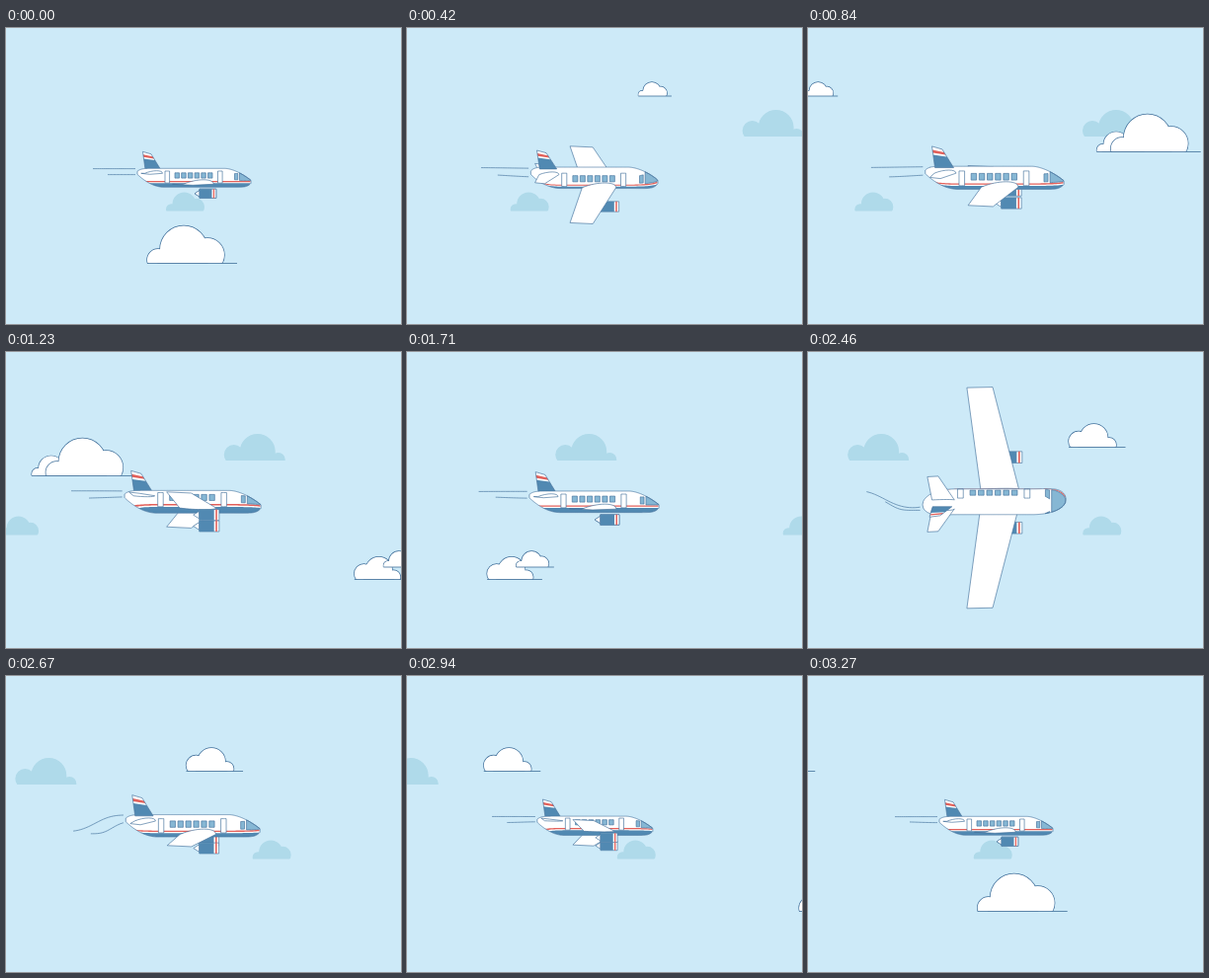
Write an HTML page with a canvas that moves like this. It is 400 px wide and 300 px high and loops after 3300 ms.

```html
<!DOCTYPE html>
<html lang="en">
<head>
<meta charset="utf-8">
<title>Airplane</title>
<style>
html, body { margin: 0; width: 100%; height: 100%; overflow: hidden; background: #cdeaf8; }
canvas { display: block; width: 400px; height: 300px; }
</style>
</head>
<body>
<canvas id="stage" width="400" height="300"></canvas>
<script>
const ctx = document.getElementById('stage').getContext('2d');
const LOOP = 3300, STEP = 30, DEG = Math.PI / 180;
const SKY = '#cdeaf8', MIST = '#afdaea', LINE = '#41709b', BLUE = '#5189b2',
      GLASS = '#86b7d4', RED = '#e2605a', WHITE = '#fff';

const clamp = (v, lo, hi) => Math.max(lo, Math.min(hi, v));
// Smooth rise from 0 to 1, and a smooth hump 0-1-0
const ramp = (t, from, to) => {
  const u = clamp((t - from) / (to - from), 0, 1);
  return u * u * (3 - 2 * u);
};
const hump = (t, from, to) => Math.sin(Math.PI * clamp((t - from) / (to - from), 0, 1)) ** 2;

// ---- clouds: circles [x, y, r] from the left end of the base line ----
const BIG = { lobes: [[11, -3.5, 11], [37, -14, 24], [61, -8.5, 17]], line: 91 };
const MID = { lobes: [[10, -6, 10], [25.5, -9.5, 14], [41, -2.5, 7]], line: 57.5 };
const LONG = { lobes: [[10, -6, 10], [34, -9, 18], [55, -1, 7]] };

// Each cloud drifts left and comes again one lap later
function cloud(t, shape, size, x, base, speed, misty) {
  for (const lap of [0, 3312]) drawCloud(shape, size, x + speed * (lap - t), base, misty);
}

function drawCloud({ lobes, line }, size, x, base, misty) {
  if (x > 402 || x < -100) return;
  const shape = new Path2D();
  for (const [cx, cy, r] of lobes) {
    shape.moveTo(cx + r, cy);
    shape.arc(cx, cy, r, 0, 7);
  }
  const from = lobes[0][0];
  shape.rect(from, -3, lobes[2][0] - from, 3);

  ctx.save();
  ctx.translate(x, base);
  ctx.scale(size, size);
  ctx.save();
  ctx.beginPath();
  ctx.rect(-2, -60, 120, 60);
  ctx.clip();
  ctx.strokeStyle = LINE;
  ctx.lineWidth = 1.4 / size;
  if (!misty) ctx.stroke(shape);
  ctx.fillStyle = misty ? MIST : WHITE;
  ctx.fill(shape);
  ctx.restore();
  if (!misty) {
    ctx.lineWidth = .8 / size;
    ctx.beginPath();
    ctx.moveTo(0, 0);
    ctx.lineTo(line, 0);
    ctx.stroke();
  }
  ctx.restore();
}

function drawClouds(t) {
  cloud(t, LONG, 1, 401.3, 110, .1468, true);
  cloud(t, BIG, .5, 162, 185.5, .1365, true);
  cloud(t, BIG, .37, 472, 69, .566);
  cloud(t, BIG, .53, 866.2, 125.5, .683);
  cloud(t, BIG, 1, 880.5, 125.5, .683);
  cloud(t, MID, .97, 1049, 230.5, .566);
  cloud(t, BIG, .42, 1078.5, 218, .566);
  cloud(t, MID, 1, 1218.5, 96.5, .388);
  cloud(t, BIG, 1, 143, 238.5, .683);
}

// ---- plane: x forward, y down, z towards the viewer ----
const rollAt = t => 23 * hump(t, 0, 1080) - 11.5 * hump(t, 980, 1740) +
  121 * hump(t, 2150, 2710) - 7.5 * hump(t, 2690, 3260);
const sizeAt = t => 1 + .22 * ramp(t, 0, 800) - .085 * ramp(t, 950, 1850) +
  .127 * ramp(t, 1750, 2440) - .262 * ramp(t, 2460, 3030);

let roll, size, sin, cos;
const CX = 197.5, CY = 151.8;
const sx = x => CX + size * x;
const sy = (y, z) => CY + size * (y * cos + z * sin);
const pt = (x, y, z) => [sx(x), sy(y, z)];

function paint(fill, stroke) {
  if (fill) { ctx.fillStyle = fill; ctx.fill(); }
  if (stroke) { ctx.strokeStyle = LINE; ctx.lineWidth = .65; ctx.stroke(); }
}

function poly(points, fill, stroke) {
  ctx.beginPath();
  for (const p of points) ctx.lineTo(...p);
  ctx.closePath();
  paint(fill, stroke);
}

// Hull section at x: height of the axis, half height and half width
function section(x) {
  const tail = Math.max(0, (-37 - x) / 27.5), nose = Math.max(0, (x - 24) / 26.5);
  const top = -9.5 + 3 * tail ** 8 + 12 * nose ** 1.7;
  const low = 9.5 - 13 * tail ** 2 - 4 * nose ** 8;
  const wide = 10.5 * Math.sqrt(Math.max(0, 1 - (tail + nose) ** 4));
  return { axis: (top + low) / 2, high: (low - top) / 2, wide };
}

function hullY(x, angle) {
  const { axis, high, wide } = section(x);
  return CY + size * (axis * cos + (high * cos * cos + wide * sin * sin) * Math.sin(angle * DEG));
}

// Angle around the hull at side height y: viewer's side, far side, over the top
const near = y => x => {
  const { axis, high } = section(x);
  return Math.asin(clamp((y - axis) / high, -1, 1)) / DEG;
};
const far = y => x => 180 - near(y)(x);
const over = y => x => -180 - near(y)(x);

// Part of the hull surface between two angles, as far as it faces the viewer
function band(x0, x1, lo, hi, fill, stroke) {
  for (const turn of [-360, 0, 360]) {
    const top = [], low = [], n = Math.ceil((x1 - x0) / 1.5);
    let seen = 0;
    for (let i = 0; i <= n; i++) {
      const x = x0 + (x1 - x0) * i / n;
      const a = hullY(x, clamp(lo(x) + roll + turn, -90, 90));
      const b = hullY(x, clamp(hi(x) + roll + turn, -90, 90));
      seen = Math.max(seen, b - a);
      top.push([sx(x), a]);
      low.unshift([sx(x), b]);
    }
    if (seen > .9) poly([...top, ...low], fill, stroke);
  }
}

// Same patch on both sides of the hull
function patch(x0, x1, y0, y1, fill, stroke) {
  band(x0, x1, near(y0), near(y1), fill, stroke);
  band(x0, x1, far(y1), far(y0), fill, stroke);
}

function hull() {
  const top = [], low = [];
  for (let x = -64.5; x <= 50.5; x += .5) {
    top.push([sx(x), hullY(x, -90)]);
    low.unshift([sx(x), hullY(x, 90)]);
  }
  const edge = [...top, ...low];
  poly(edge, WHITE);
  band(-64, 50, near(5.5), far(5.5), BLUE);
  patch(-64, 50, 3.2, 4.4, RED);
  band(39, 50, over(2.8), near(2.8), GLASS, true);
  patch(34, 37.3, -4.3, 2, GLASS, true);
  for (let i = 0; i < 6; i++) patch(-26.5 + 6.7 * i, -22 + 6.7 * i, -5, .3, GLASS, true);
  for (const x of [-36.5, 17]) patch(x, x + 4.6, -6.8, 5.3, WHITE, true);
  poly(edge, null, true);
}

// Wings: back and front x at tip and root; the root bulges upwards
const WING = { tip: [-29, -8.3], root: [-18, 12.7], y: 6.5, inner: 8, span: 100, bulge: 6 };
const TAIL = { tip: [-60.7, -52], root: [-57, -39], y: -4.5, inner: 4, span: 25, bulge: 3.5 };

function drawWing({ tip, root, y, inner, span, bulge }, side) {
  const rise = y - bulge * clamp(1 + 9 * sin * side, -.3, 1);
  inner *= side;
  span *= side;
  ctx.beginPath();
  ctx.moveTo(...pt(tip[0], y, span));
  ctx.lineTo(...pt(root[0], y, inner));
  ctx.bezierCurveTo(...pt(root[0] * .55 + root[1] * .45, rise, inner),
    ...pt(root[1], rise, inner), ...pt(root[1], y, inner));
  ctx.lineTo(...pt(tip[1], y + 1, span));
  ctx.closePath();
  paint(WHITE, true);
}

function engine(side) {
  const y = sy(16, 32 * side), r = 4.6 * size;
  const ring = (a, b, fill, stroke) =>
    poly([[sx(a), y - r], [sx(b), y - r], [sx(b), y + r], [sx(a), y + r]], fill, stroke);
  poly([[sx(-6.5), y], [sx(-1.5), y - r * .7], [sx(-1.5), y + r * .7]], WHITE, true);
  ring(-1.5, 15.3, WHITE, true);
  ring(-1.5, 11, BLUE);
  ring(12.3, 13.6, RED);
}

function fin() {
  const edge = h => [
    pt(-56.5 - 2.5 * h, -8.5 - 18 * h, 0),
    pt(-41 - 9.5 * h, -8.5 - 15.5 * h, 0)
  ];
  const slice = (a, b, fill, stroke) => poly([...edge(a), ...edge(b).reverse()], fill, stroke);
  slice(0, 1, WHITE);
  slice(0, .6, BLUE);
  slice(.7, .84, RED);
  slice(0, 1, null, true);
}

// Streaks follow the roll of the tail with a delay
function trail(length, y, z, t) {
  ctx.beginPath();
  for (let i = 0; i <= 20; i++) {
    const a = rollAt(t - 11 * i) * DEG;
    ctx.lineTo(sx(-66.5 - length * i / 20), CY + size * (y * Math.cos(a) + z * Math.sin(a)));
  }
  paint(null, true);
}

function drawPlane(t) {
  roll = rollAt(t);
  size = sizeAt(t);
  sin = Math.sin(roll * DEG);
  cos = Math.cos(roll * DEG);
  trail(43, -9.2, 0, t);
  trail(28, -3.2, 6, t);
  // [depth, painter], farthest first
  const parts = [[0, hull], [15 * sin - .01, fin]];
  for (const side of [-1, 1]) {
    const root = 8 * cos * side - 6 * sin;
    parts.push([root, () => drawWing(WING, side)]);
    parts.push([root - .1 * Math.sign(sin + .001), () => engine(side)]);
    parts.push([5 * cos * side + 5 * sin, () => drawWing(TAIL, side)]);
  }
  parts.sort((a, b) => a[0] - b[0]).forEach(part => part[1]());
}

function draw(t) {
  ctx.fillStyle = SKY;
  ctx.fillRect(0, 0, 400, 300);
  ctx.lineJoin = 'round';
  drawClouds(t);
  drawPlane(t);
}

let start;
function tick(now) {
  start ??= now;
  draw(Math.floor((now - start) % LOOP / STEP) * STEP);
  requestAnimationFrame(tick);
}
draw(0);
requestAnimationFrame(tick);
</script>
</body>
</html>
```
